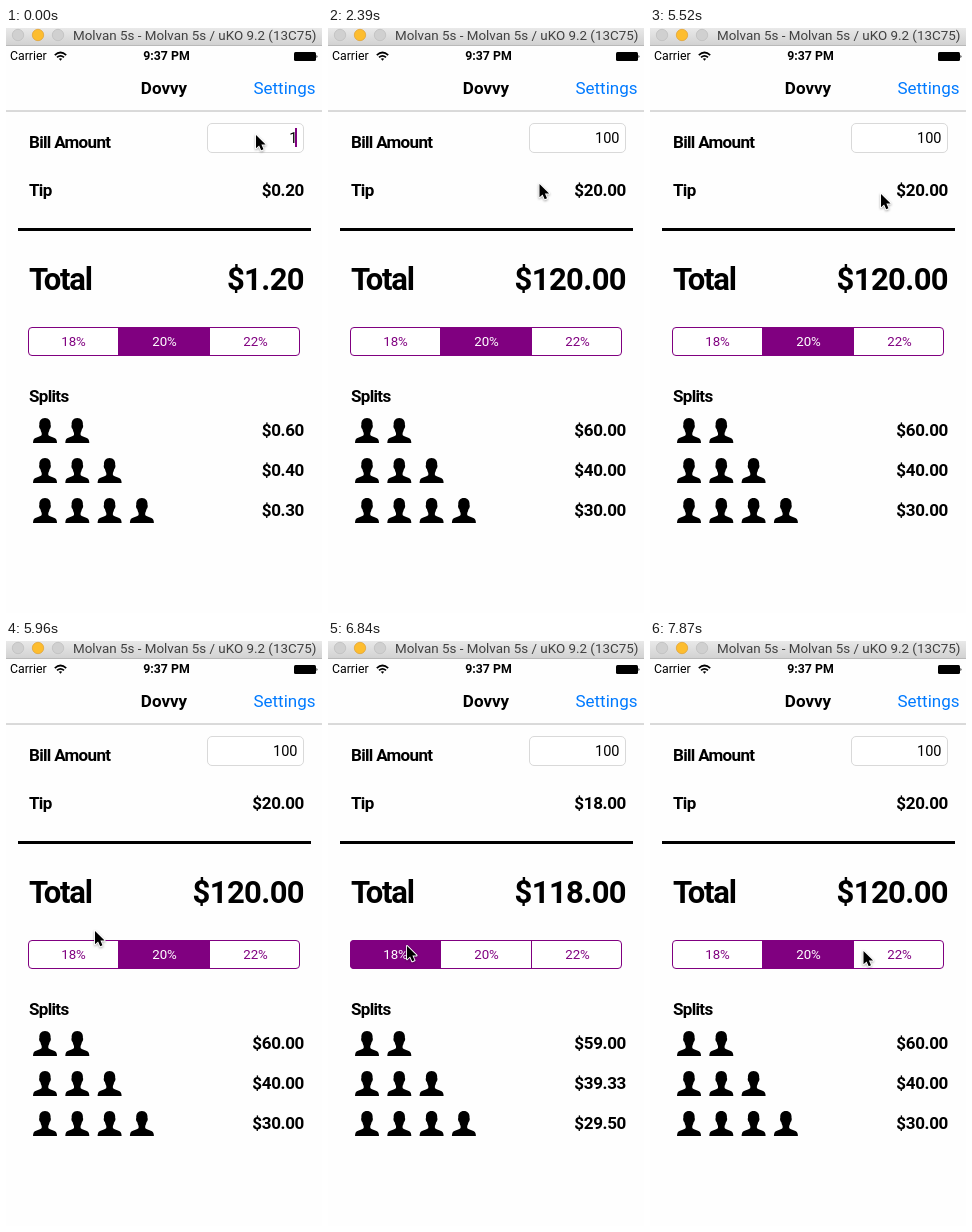
These frames come from a looping animation (316x585 px, 8 s). An HTML page:

```html
<!DOCTYPE html>
<html lang="en">
<head>
<meta charset="utf-8">
<title>Tip calculator</title>
<style>
  html, body { margin: 0; width: 100%; height: 100%; overflow: hidden; background: #fefefe; }
  svg { display: block; width: 316px; height: 585px; }
  text { font-family: Roboto, "Liberation Sans", sans-serif; }
  .cond { font-size: 17px; font-weight: 600; font-stretch: 75%; letter-spacing: -.04em; }
  .sum { letter-spacing: -.02em; }
  .big { font-size: 31px; }
  .end { text-anchor: end; }
  .mid { text-anchor: middle; }
  .seg { font-size: 13.3px; text-anchor: middle; }
  #cursor { filter: drop-shadow(0 1px 1px #0005); }
</style>
</head>
<body>
<svg viewBox="0 0 316 585">
  <defs>
    <linearGradient id="chrome" x2="0" y2="1">
      <stop stop-color="#e9e9e9"/><stop offset="1" stop-color="#d2d2d2"/>
    </linearGradient>
    <clipPath id="round"><rect x="22" y="299" width="272" height="29" rx="4"/></clipPath>
    <path id="person" d="M12 0C8 0 6 3 6.400 7C6 7 5.900 10 7.300 11C7.800 13 8.300 14 8.700 15V17C7 19 1.500 19 .5 22Q0 23.500 0 25H24Q24 23.500 23.500 22C22.500 19 17 19 15.300 17V15C15.700 14 16.200 13 16.700 11C18.100 10 18 7 17.600 7C18 3 16 0 12 0Z"/>
  </defs>
  <rect width="316" height="585" fill="#fefefe"/>

  <rect width="316" height="17" fill="url(#chrome)"/>
  <path d="M0 17.500H316" stroke="#b9b9b9"/>
  <g stroke-width=".7">
    <circle cx="12" cy="7" r="5.700" fill="#d0d0d0" stroke="#bcbcbc"/>
    <circle cx="32" cy="7" r="5.700" fill="#fdbd2f" stroke="#e0a030"/>
    <circle cx="52" cy="7" r="5.700" fill="#d0d0d0" stroke="#bcbcbc"/>
  </g>
  <text x="67" y="12" font-size="13.400" fill="#404040">Molvan 5s - Molvan 5s / uKO 9.2 (13C75)</text>

  <text x="4" y="32" font-size="12.300">Carrier</text>
  <g fill="none" stroke="#000" stroke-width="1.700">
    <path d="M48.800 27.200Q54.500 21.800 60.200 27.200M51 29.400Q54.500 26.200 58 29.400"/>
    <path d="M52.800 30.800L54.500 32.800L56.200 30.800Q54.500 29.500 52.800 30.800Z" fill="#000" stroke="none"/>
  </g>
  <text class="mid" x="160.500" y="32" font-size="12.300" font-weight="600">9:37 PM</text>
  <rect x="288" y="24" width="22" height="9" rx="1.500"/>
  <path d="M310.500 27Q312.500 28.500 310.500 30Z"/>

  <text class="mid" x="158" y="66" font-size="17" font-weight="600">Dovvy</text>
  <text class="end" x="309.500" y="66" font-size="17" fill="#007aff">Settings</text>
  <path d="M0 83H316" stroke="#b5b5b5"/>

  <text class="cond" x="23" y="120">Bill Amount</text>
  <rect x="201.500" y="95.500" width="96" height="29" rx="4.500" fill="#fff" stroke="#d9d9d9"/>
  <text class="end" id="bill" x="291.500" y="115" font-size="14.500"></text>
  <rect id="caret" x="289" y="100" width="2" height="19" fill="#800080"/>

  <text class="cond" x="23" y="168">Tip</text>
  <path d="M12 201.500H305" stroke="#000" stroke-width="3"/>
  <text class="cond big" x="23" y="262">Total</text>
  <g id="segments" clip-path="url(#round)"></g>
  <path d="M112.500 299V328M203.500 299V328" stroke="#800080"/>
  <rect x="22.500" y="299.500" width="271" height="28" rx="3.500" fill="none" stroke="#800080"/>
  <g id="labels"></g>
  <text class="cond" x="23" y="374">Splits</text>
  <g id="people"></g>
  <g id="money"></g>

  <path id="cursor" d="M0 0V13.300L3.100 10.400L5.200 15.300L7.500 14.300L5.400 9.500H9.600Z" stroke="#fff" stroke-width="1.800" stroke-linejoin="round" paint-order="stroke"/>
</svg>
<script>
const LOOP = 8000, STEP = 146.6, PURPLE = "#800080", PRESSED = "#e6cce6";
const RATES = [18, 20, 22];
const TAP_LOW = 6690, TAP_MID = 7570;

// Pointer moves: start time, number of steps, destination.
const HOME = [250, 107];
const GLIDES = [
  [1800, 5, 211.5, 156],
  [5520, 1, 231, 166],
  [5666, 3, 89, 290],
  [6106, 2, 79, 305],
  [6986, 6, 170, 313],
  [7865, 1, 213.5, 310],
];

const $ = id => document.getElementById(id);
const clamp = (v, lo, hi) => Math.min(hi, Math.max(lo, v));

function add(parent, tag, attrs, text = "") {
  const el = document.createElementNS("http://www.w3.org/2000/svg", tag);
  for (const key in attrs) el.setAttribute(key, attrs[key]);
  el.textContent = text;
  return $(parent).appendChild(el);
}

const segments = RATES.map((_, i) =>
  add("segments", "rect", { x: 22 + 90.7 * i, y: 299, width: 91, height: 29 }));
const labels = RATES.map((rate, i) =>
  add("labels", "text", { class: "seg", x: 67.5 + 91 * i, y: 318 }, rate + "%"));

for (let row = 0; row < 3; row++)
  for (let i = 0; i < row + 2; i++)
    add("people", "use", { href: "#person", x: 27 + 32.3 * i, y: 390 + 40 * row });

const money = [168, 262, 408, 448, 488].map((y, i) =>
  add("money", "text", { class: "cond sum end" + (i === 1 ? " big" : ""), x: 298, y }));

function pointer(t) {
  let [x, y] = HOME;
  for (const [start, steps, toX, toY] of GLIDES) {
    const p = clamp(Math.floor((t - start) / STEP) + 1, 0, steps) / steps;
    const k = p * p * (3 - 2 * p);
    x += (toX - x) * k;
    y += (toY - y) * k;
  }
  return [x, y];
}

// Solid while typing, then a soft one-second blink until focus is lost.
function caret(t) {
  if (t < 1350) return 1;
  if (t >= 4170) return 0;
  return clamp(.5 - 2.2 * Math.cos(2 * Math.PI * (t - 600) / 1000), 0, 1);
}

function draw(t) {
  const typed = "100".slice(0, 1 + (t >= 300) + (t >= 750));
  const choice = t >= TAP_LOW && t < TAP_MID ? 0 : 1;
  const held = tap => t >= tap - STEP && t < tap;
  const press = held(TAP_LOW) ? 0 : held(TAP_MID) ? 1 : -1;
  const tip = typed * RATES[choice] / 100, total = +typed + tip;

  $("bill").textContent = typed;
  $("caret").setAttribute("opacity", caret(t));
  [tip, total, total / 2, total / 3, total / 4].forEach((sum, i) => {
    money[i].textContent = "$" + sum.toFixed(2);
  });
  segments.forEach((el, i) => {
    el.setAttribute("fill", i === choice ? PURPLE : i === press ? PRESSED : "#fff");
    labels[i].setAttribute("fill", i === choice ? "#fff" : PURPLE);
  });
  $("cursor").setAttribute("transform", `translate(${pointer(t)})`);
}

function tick(now) {
  draw(now % LOOP);
  requestAnimationFrame(tick);
}
draw(0);
requestAnimationFrame(tick);
</script>
</body>
</html>
```
